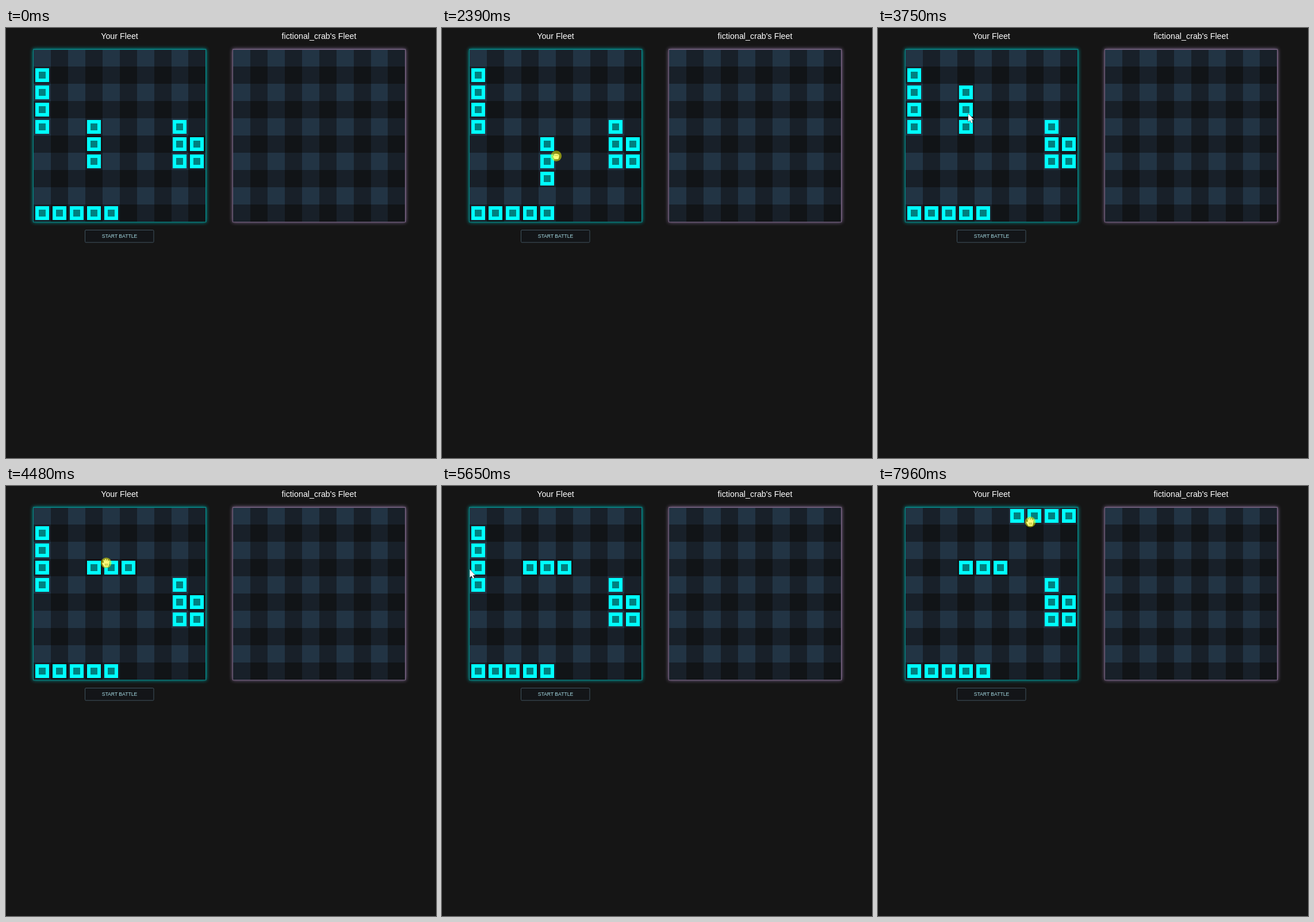
An HTML page that plays this animation: 748x748 px, repeating every 7.99 s.

```html
<!DOCTYPE html>
<html lang="en">
<head>
<meta charset="utf-8">
<title>Fleet setup</title>
<style>
  html, body { margin: 0; width: 100%; height: 100%; overflow: hidden; background: #151515; }
  svg { display: block; width: 748px; height: 748px; }
  text { font-family: "Liberation Sans", Arial, sans-serif; text-anchor: middle; }
  .title { font-size: 14.3px; fill: #fff; }
  .label { font-size: 8.6px; fill: #a9dfe8; }
  .cells, .ships { shape-rendering: crispEdges; }
  .frame { fill: #111417; stroke-width: 2; }
  .own { stroke: #078585; filter: drop-shadow(0 0 3px #00a5a5); }
  .foe { stroke: #75617f; filter: drop-shadow(0 0 3px #8d73a0); }
  .cursor path { fill: #fff; stroke: #111; stroke-width: 1; stroke-linejoin: round; paint-order: stroke; }
</style>
</head>
<body>
<svg viewBox="0 0 748 748">
  <text class="title" x="197.5" y="18.5">Your Fleet</text>
  <text class="title" x="544.5" y="18.5">fictional_crab's Fleet</text>
  <g id="boards"></g>
  <rect x="137.5" y="351.5" width="119.5" height="21.5" rx="1.5" fill="#131518" stroke="#40535f"/>
  <text class="label" x="197.5" y="365.2">START BATTLE</text>
  <g id="ships" class="ships"></g>
  <g id="cursor" class="cursor">
    <path id="arrow" d="M0-1V13L3.2 10.2L5.4 15.2L7.8 14.2L5.6 9.3H9.6Z"/>
    <g id="open">
      <path d="M-3.4 7C-4.6 4.4-6.6 2.2-7 .4C-6.8-.9-5.2-.7-4-.1L-4.9-4.2C-4.9-5.7-3.3-5.9-2.8-4.5L-2.1-2.4L-2.2-6C-2-7.3-.3-7.3 0-6L.3-2.6L1.2-5.8C1.7-7 3.2-6.7 3.1-5.3L2.8-2L4-4C4.7-5 6-4.4 5.8-3.2C5.3 0 5.2 4 3.6 7Z"/>
      <path d="M-1.7 1V5M.4 1V5M2.4 1V5" style="stroke-width:.7"/>
    </g>
    <g id="fist">
      <path d="M-3 5.5C-4.5 3.7-5.8 2.3-5.6.6C-5.4-.4-4.6-.7-4.1-.4V-2.6C-3.7-4-2.2-3.9-1.9-3.2C-1.3-4.5.2-4.4.6-3.3C1.2-4.2 2.6-4 2.9-2.7C3.7-3.3 5-2.8 5 -1.4C5 1.4 4.6 3.4 3.4 5.5Z"/>
      <path d="M-1.8-2V0M.6-2V0M2.9-1.8V0" style="stroke-width:.7"/>
    </g>
    <circle id="halo" r="9.3" fill="#ff0" fill-opacity=".5"/>
  </g>
</svg>
<script>
const LOOP = 7990, PITCH = 29.94, LEFT = 48, TOP = 37.5;
const $ = id => document.getElementById(id);

function rect(parent, x, y, w, h, attrs) {
  const el = document.createElementNS('http://www.w3.org/2000/svg', 'rect');
  for (const [k, v] of Object.entries({ x, y, width: w, height: h, ...attrs })) el.setAttribute(k, v);
  return parent.appendChild(el);
}

function group(parent, cls) {
  const el = document.createElementNS('http://www.w3.org/2000/svg', 'g');
  if (cls) el.setAttribute('class', cls);
  return parent.appendChild(el);
}

function board(left, cls) {
  const size = PITCH * 10, shades = ['#223444', '#182029', '#111417'];
  rect($('boards'), left, TOP, size, size, { class: 'frame ' + cls });
  const cells = group($('boards'), 'cells');
  for (let i = 0; i < 100; i++) {
    const c = i % 10, r = Math.floor(i / 10);
    rect(cells, left + c * PITCH, TOP + r * PITCH, PITCH, PITCH, { fill: shades[c % 2 + r % 2] });
  }
}
board(LEFT, 'own');
board(395, 'foe');

// Pointer path: time, x, y
const path = [
  [210, 681, 736], [490, 634, 607], [840, 634, 607], [1130, 185, 270], [1250, 115, 198],
  [1350, 138, 184], [1470, 165, 192], [1870, 165, 192], [2100, 168, 212], [2350, 195, 222],
  [2640, 218, 225], [2670, 219, 224], [2810, 273, 185], [2930, 244, 156], [3050, 163, 146.5],
  [3580, 163, 146.5], [3750, 157, 150], [3980, 157, 148], [4220, 178, 118], [4380, 178, 118],
  [4640, 164, 165], [4820, 158, 150], [5080, 178, 120], [5190, 178, 120], [5280, 178, 148],
  [5590, 45, 148], [5690, 50, 145], [5900, 50, 145], [6400, 230, 113.5], [6700, 230, 113.5],
  [6910, 250, 88], [7140, 250, 88], [7260, 253, 86], [7540, 253, 86], [7740, 268, 59.5],
  [7890, 268, 59.5], [7955, 265, 62.5], [LOOP, 265, 62.5]
];

const slope = (i, k) => (path[i + 1][k] - path[i][k]) / (path[i + 1][0] - path[i][0]);

// Rests and turning points get a flat tangent, others the harmonic mean
function tangent(i, k) {
  if (i === 0 || i === path.length - 1) return 0;
  const a = slope(i - 1, k), b = slope(i, k);
  return a * b > 0 ? 2 * a * b / (a + b) : 0;
}

function pointer(t) {
  let i = 0;
  while (i < path.length - 2 && path[i + 1][0] <= t) i++;
  const [t0] = path[i], dt = path[i + 1][0] - t0;
  const u = Math.min(1, Math.max(0, (t - t0) / dt)), v = 1 - u;
  return [1, 2].map(k =>
    path[i][k] * (1 + 2 * u) * v * v + path[i + 1][k] * u * u * (3 - 2 * u) +
    dt * u * v * (tangent(i, k) * v - tangent(i + 1, k) * u));
}

const fleet = [
  { col: 0, row: 1, size: 4, drags: [[5900, 6420]], turn: 7200 },
  { col: 3, row: 4, size: 3, drags: [[1870, 3350], [4380, 5285]], turn: 3960 },
  { col: 8, row: 4, size: 3 },
  { col: 9, row: 5, size: 2 },
  { col: 0, row: 9, size: 5, flat: true }
];

for (const ship of fleet) {
  ship.cells = Array.from({ length: ship.size }, () => {
    const cell = group($('ships'));
    rect(cell, 0, 0, 24, 24, { fill: '#0ff' });
    rect(cell, 6, 6, 12, 12, { fill: '#008080' });
    return cell;
  });
}

// A drag moves the ship by whole cells; a click turns it about its first cell
function placeShip(ship, t) {
  let { col, row } = ship;
  for (const [from, to] of ship.drags || []) {
    if (t < from) continue;
    const a = pointer(from), b = pointer(Math.min(t, to));
    col += Math.round((b[0] - a[0]) / PITCH);
    row += Math.round((b[1] - a[1]) / PITCH);
  }
  const flat = ship.flat || t >= ship.turn;
  ship.cells.forEach((cell, i) => {
    const x = Math.round(LEFT + (col + (flat ? i : 0)) * PITCH + 2.8);
    const y = Math.round(TOP + (row + (flat ? 0 : i)) * PITCH + 2.6);
    cell.setAttribute('transform', `translate(${x} ${y})`);
  });
}

const pressed = [[1620, 3370], [3920, 4020], [4380, 5300], [5900, 6700], [7140, 7260], [7890, LOOP]];
const hand = [[1870, 3580], [4150, 5340], [5800, 6420], [6820, 7220], [7640, LOOP]];
const gripping = [[1870, 3350], [5930, 6420]];
const within = (spans, t) => spans.some(([a, b]) => t >= a && t < b);
const show = (id, on) => { $(id).style.display = on ? '' : 'none'; };

function draw(t) {
  fleet.forEach(ship => placeShip(ship, t));
  const [x, y] = pointer(t), isHand = within(hand, t), fist = within(gripping, t);
  $('cursor').setAttribute('transform', `translate(${x.toFixed(2)} ${y.toFixed(2)})`);
  show('cursor', t >= 210);
  show('arrow', !isHand);
  show('open', isHand && !fist);
  show('fist', isHand && fist);
  show('halo', within(pressed, t));
}

const start = performance.now();
function tick() {
  draw((performance.now() - start) % LOOP);
  requestAnimationFrame(tick);
}
tick();
</script>
</body>
</html>
```
